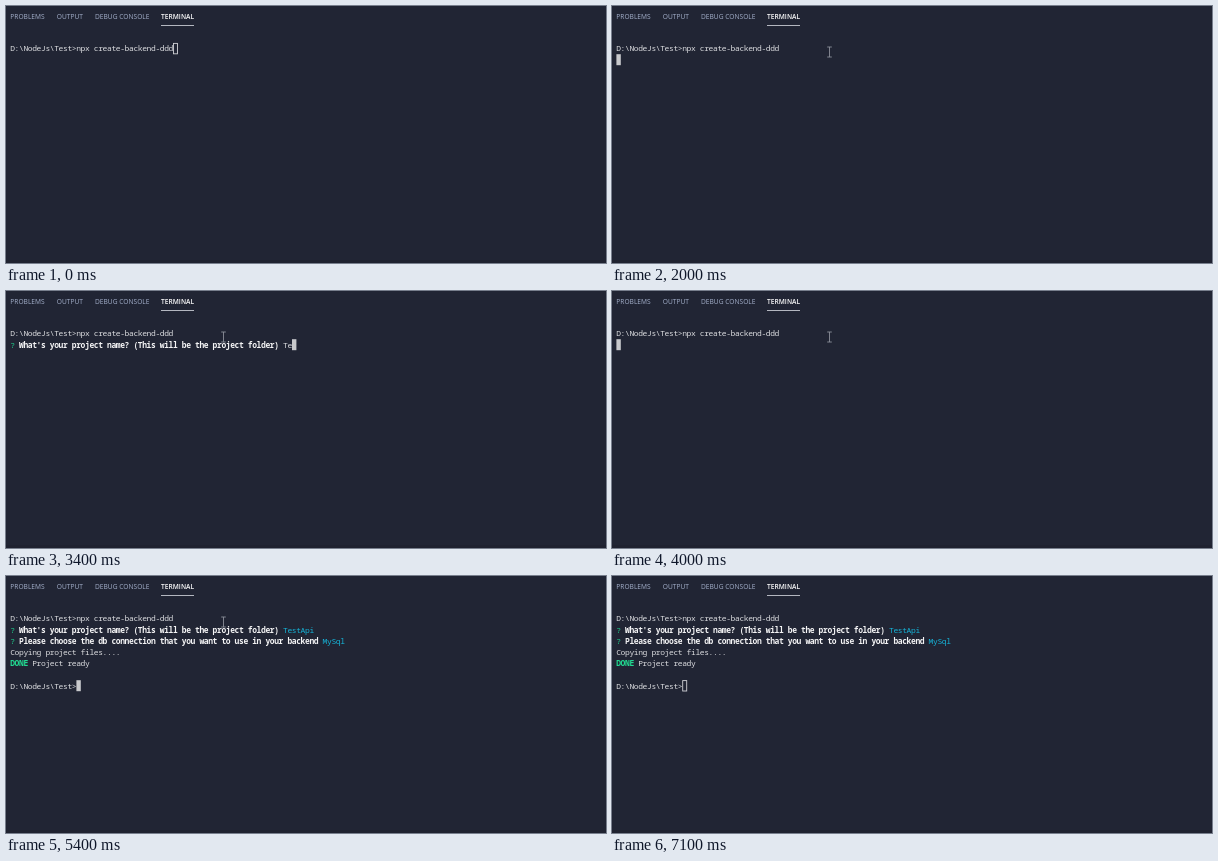
An HTML page with a canvas that plays this animation: 600 px wide and 257 px high, repeating every 8 s.

```html
<!DOCTYPE html>
<html lang="en">
<head>
<meta charset="utf-8">
<style>
html, body { margin: 0; width: 100%; height: 100%; overflow: hidden; background: #212534; }
canvas { display: block; }
</style>
</head>
<body>
<canvas id="stage" width="600" height="257"></canvas>
<script>
const ctx = document.getElementById('stage').getContext('2d');
const LOOP = 8000, TICK = 100;
const LEFT = 4.4, TOP = 37, CELL = 4.4, LINE = 11.2, ZOOM = 10;
const MONO = '"Noto Sans Mono", monospace', SANS = '"Open Sans", sans-serif';
const INK = {
  plain: '#dcdde0', dim: '#8b8e99', bold: '#f4f4f5',
  green: '#1fd08c', done: '#22dc92', cyan: '#16b4d8'
};

// Drawing at a large font size inside a scaled context keeps subpixel spacing.
function text(str, x, y, size, family, color, weight = 400) {
  ctx.save();
  ctx.translate(x, y);
  ctx.scale(1 / ZOOM, 1 / ZOOM);
  ctx.font = `${weight} ${size * ZOOM}px ${family}`;
  ctx.fillStyle = color;
  ctx.fillText(str, 0, 0);
  ctx.restore();
}

// Terminal glyphs sit one per cell, slightly larger than their natural pitch.
function drawRow(runs, row) {
  let col = 0;
  for (const [style, str] of runs) {
    const weight = style === 'bold' || style === 'done' ? 700 : 500;
    for (const char of str) {
      text(char, LEFT - 0.2 + col++ * CELL, TOP + 8.3 + row * LINE, 8, MONO, INK[style], weight);
    }
  }
}

function drawCaret(col, row, hollow) {
  const x = LEFT + col * CELL, y = TOP + row * LINE;
  if (hollow) {
    ctx.strokeStyle = '#d0d1d5';
    ctx.lineWidth = 0.9;
    ctx.strokeRect(x + 0.3, y + 0.4, CELL - 0.4, LINE - 0.8);
  } else {
    ctx.fillStyle = '#c8c9cc';
    ctx.fillRect(x, y, CELL, LINE - 0.2);
  }
}

function drawPointer([x, y]) {
  ctx.strokeStyle = '#8c8f99';
  ctx.lineWidth = 0.9;
  ctx.beginPath();
  ctx.moveTo(x, y - 5);
  ctx.lineTo(x, y + 5);
  for (const end of [y - 5, y + 5]) {
    ctx.moveTo(x - 2.3, end);
    ctx.lineTo(x + 2.3, end);
  }
  ctx.stroke();
}

function drawTabs() {
  const tabs = [['PROBLEMS', 4.3], ['OUTPUT', 50.8], ['DEBUG CONSOLE', 89]];
  for (const [name, x] of tabs) text(name, x, 12.5, 6.65, SANS, '#a4b0cb', 500);
  text('TERMINAL', 155, 12.5, 6.65, SANS, '#ffffff', 600);
  ctx.fillStyle = '#b4b7c0';
  ctx.fillRect(155, 19, 33, 1);
}

const prompt = ['plain', 'D:\\NodeJs\\Test>'];
const command = [prompt, ['plain', 'npx create-backend-ddd']];
const ask = (question, style, answer = '') =>
  [['green', '? '], ['bold', question + ' '], [style, answer]];
const askName = (style, answer) =>
  ask("What's your project name? (This will be the project folder)", style, answer);
const askDb = (style, answer) =>
  ask('Please choose the db connection that you want to use in your backend', style, answer);

const named = [command, askName('cyan', 'TestApi')];
const choosing = [...named, askDb('plain', '(Use arrow keys)')];
const mysql = [['cyan', '> MySql']];
const listed = [...choosing, mysql, [['plain', '  PostgreSQL']]];
const copying = [...named, askDb('cyan', 'MySql'), [['plain', 'Copying project files....']]];
const ready = [...copying, [['done', 'DONE'], ['plain', ' Project ready']]];
const finished = [...ready, [], [prompt]];
const waiting = [command, []];
const typed = str => [command, askName('plain', str)];

// Each entry: start time, rows, and an optional caret [column, row].
const screens = [
  [0, [command]],
  [1200, waiting],
  [2500, [command, askName('dim', '(my-backend-app) ')]],
  [3100, waiting],
  [3200, typed('T')],
  [3300, waiting],
  [3400, typed('Te')],
  [3500, typed('Tes')],
  [3600, typed('Test')],
  [3700, typed('TestA')],
  [3800, typed('TestApi')],
  [4000, waiting],
  [4100, [...named, []]],
  [4200, choosing],
  [4300, [...choosing, mysql]],
  [4400, listed, [87, 4]],
  [5000, [...named, []]],
  [5100, [...copying, []]],
  [5300, [...ready, []]],
  [5400, finished]
];

const pointerPath = [
  [0], [100, 248, 68.5], [200, 238.5, 68.5], [400, 228, 60], [500, 220, 52.5],
  [900, 220.5, 52.5], [1800, 219.5, 50], [1900, 218.5, 48], [2000, 217.5, 46],
  [6800, 270, 72], [6900, 400, 105], [7000, 560, 119], [7100]
];

const current = (steps, t) => steps.filter(step => step[0] <= t).pop();

function draw(t) {
  ctx.fillStyle = '#212534';
  ctx.fillRect(0, 0, 600, 257);
  ctx.fillStyle = '#1f2230';
  ctx.fillRect(0, 254, 600, 3);
  drawTabs();

  const [, rows, caret] = current(screens, t);
  rows.forEach(drawRow);
  const last = rows.length - 1;
  const width = rows[last].reduce((sum, run) => sum + run[1].length, 0);
  const [col, row] = caret || [width, last];
  drawCaret(col, row, t < 500 || t >= 7100);

  const [, ...pointer] = current(pointerPath, t);
  if (pointer.length) drawPointer(pointer);
}

function frame() {
  const t = performance.now() % LOOP;
  draw(Math.floor(t / TICK) * TICK);
  requestAnimationFrame(frame);
}
frame();
</script>
</body>
</html>
```
